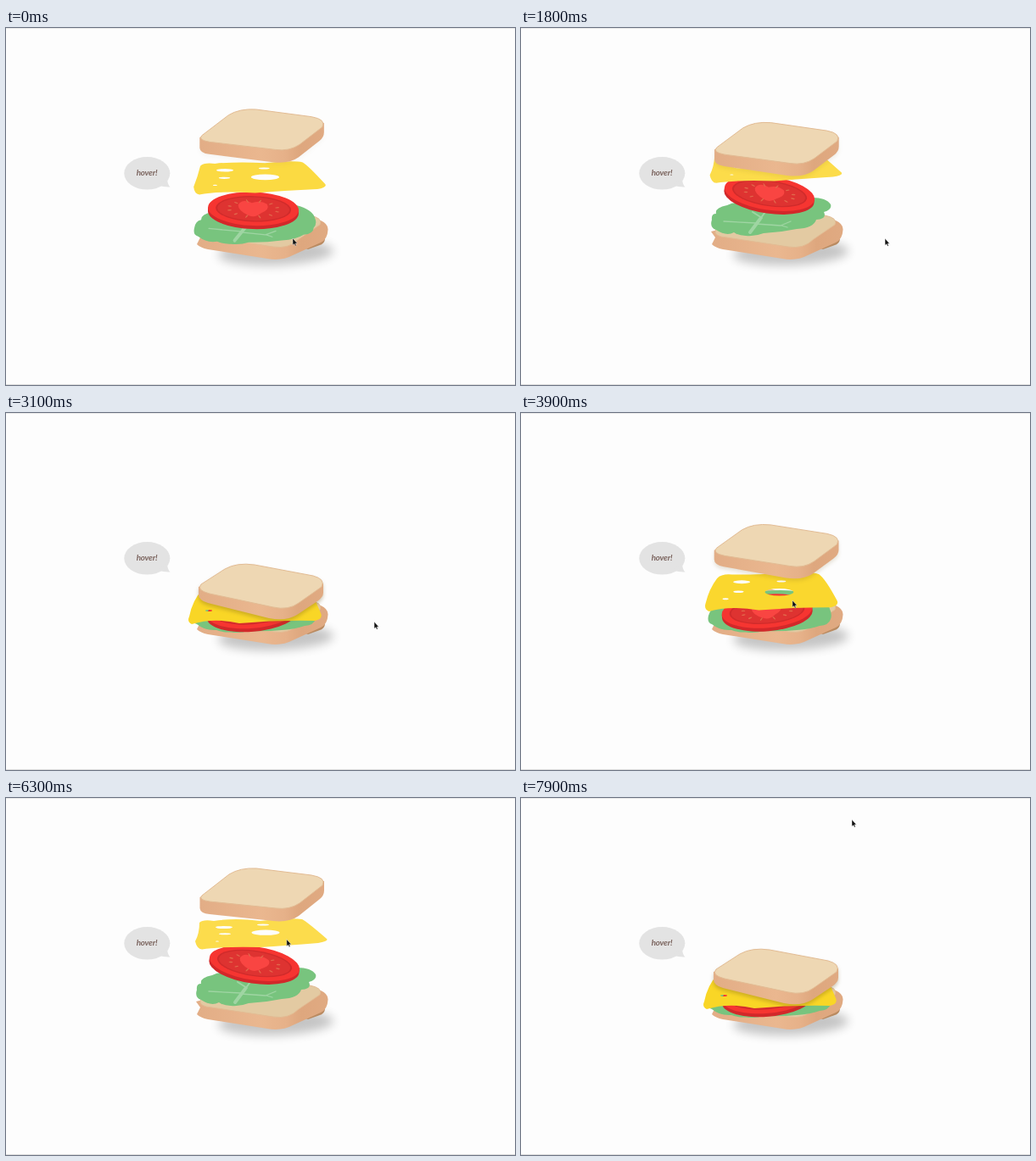
An HTML page that plays this animation: 600x421 px, repeating every 8 s.

```html
<!DOCTYPE html>
<html lang="en">
<head>
<meta charset="utf-8">
<title>Hover sandwich</title>
<style>
  html, body { margin: 0; width: 100%; height: 100%; overflow: hidden; background: #fdfdfd; }
  svg { display: block; width: 600px; height: 421px; }
  text { font: italic 700 9.8px Lato, sans-serif; letter-spacing: -.2px; fill: #7b645e; }
  .face { fill: #eed7b3; stroke: #e2bb93; stroke-width: 1; }
  .vein { fill: none; stroke: #9fd5a3; stroke-linecap: round; stroke-linejoin: round; }
</style>
</head>
<body>
<svg viewBox="0 0 600 421">
  <defs>
    <linearGradient id="crust">
      <stop offset="0" stop-color="#e2ad86"/>
      <stop offset=".5" stop-color="#eab78f"/>
      <stop offset=".68" stop-color="#e6b189"/>
      <stop offset=".8" stop-color="#dea77e"/>
      <stop offset="1" stop-color="#e0aa82"/>
    </linearGradient>
    <filter id="soft" x="-30%" y="-80%" width="160%" height="260%">
      <feGaussianBlur stdDeviation="6"/>
    </filter>
  </defs>

  <path d="M0 .5H600" stroke="#e9e9e9"/>
  <path d="M0 420.5H600" stroke="#dedede"/>

  <g fill="#e3e3e3">
    <ellipse cx="166.3" cy="171.3" rx="27" ry="19.3"/>
    <path d="M190 177Q190 184 193.500 187.500Q186 188 179 185z"/>
  </g>
  <text x="166" y="174" text-anchor="middle">hover!</text>

  <ellipse cx="318" cy="265" rx="68" ry="15" fill="#000" opacity=".22"
    transform="rotate(-2 318 265)" filter="url(#soft)"/>

  <path fill="#b98a60" d="M350 259L376 248Q376 254 370 256L356 261z"/>
  <path fill="url(#crust)" d="M224 240L229 247L225 255Q229 259 238 261L308 272Q325 275 338 268L371 253Q379 249 379.500 238Q380 231 371 227L293 209L240 236z"/>
  <path class="face" style="fill:#e3caa2" d="M230 237L259 214Q273 205 293 208L358 221Q374 224 370 232L345 249Q333 261 315 258L236 246Q226 243 230 237z"/>

  <path id="lettuce" fill="#78c47e"/>
  <g id="veins" class="vein">
    <path stroke-width="4" d="M270 241L282 225"/>
    <path stroke-width="2" d="M280 228L290 214M284 224L273 217"/>
    <path stroke-width="1.300" d="M239 228L277 230M277 231L306 233L318 228M307 233L314 235"/>
  </g>

  <g id="tomato">
    <path d="M-53.500 0V4A53.500 19.800 0 0 0 53.500 4V0z" fill="#d2282a"/>
    <ellipse rx="53.5" ry="19.8" fill="#f63531"/>
    <ellipse rx="44.5" ry="15.2" fill="#d02b2b"/>
    <ellipse rx="42.5" ry="13.8" fill="#de3331"/>
    <path fill="#f94542" d="M-18 -4Q-14 -12 -2 -7Q8 -11 16 -6Q20 0 9 5Q2 11 -5 8Q-18 3 -18 -4z"/>
    <g id="seeds" fill="#e2684c"/>
  </g>

  <path id="cheese" fill-rule="evenodd"/>

  <g id="lid">
    <path id="side" fill="url(#crust)"/>
    <path id="top" class="face"/>
  </g>

  <path id="cursor" d="M0 0V8L1.800 6.500L3 9L4.200 8.400L3.100 6H5.400z"
    fill="#111" stroke="#fff" stroke-width=".4"/>
</svg>

<script>
const LOOP = 8000, MOVE = 800;
const OPENS = [-456, 3670], CLOSES = [1640, 6730];
const $ = id => document.getElementById(id);

const hole = (x, y, rx, ry) =>
  `M${x - rx} ${y}a${rx} ${ry} 0 1 0 ${2 * rx} 0a${rx} ${ry} 0 1 0 ${-2 * rx} 0z`;

// Each shape: [closed, open], with matching path commands
const SHAPES = {
  top: [
    'M230 202L258 184Q272 176 293 179L362 192Q377 196 372 205L345 224Q333 233 315 229L240 213Q224 209 230 202z',
    'M231 115L263 90Q276 82 295 83L360 91Q378 94 373 103L346 124Q334 132 318 130L240 122Q226 120 231 115z'
  ],
  side: [
    'M227 205L227 214Q227 221 238 224L310 242Q330 246 343 238L367 222Q374 217 374 212L374 201L290 185z',
    'M228.500 117L228.500 130Q229 136 240 137L315 145Q334 147 345 139L370 119Q375 115 375 109L375 98L290 88z'
  ],
  cheese: [
    'M232 208Q238 202 250 203Q290 204 320 201Q345 199 352 203Q360 209 371 236Q374 243 364 245Q320 244 275 248Q245 241 219 249Q213 246 216 240Q220 220 232 208z' +
      hole(261, 212, 10, 2) + hole(256, 224.5, 6, 1.4) + hole(304, 225.5, 17, 4.5) +
      hole(308, 212, 5, 1) + hole(239, 233, 4, 1.1),
    'M228 147Q232 143 245 145Q270 141 300 145Q335 141 349 143Q355 146 378 166Q381 169 368 171Q330 174 300 176Q250 175 231 178.500Q225 178 223 169Q228 160 228 147z' +
      hole(257, 152.5, 10, 1.6) + hole(258, 160.3, 7, 1) + hole(306, 158.7, 16.5, 3.1) +
      hole(303, 149.5, 7, 1) + hole(249, 169, 2, .5)
  ],
  lettuce: [
    'M221 239Q223 231 230 229Q231 222 243 221Q251 215 260 217Q270 215 278 211Q311 206 343 213Q362 220 364 231Q367 238 365 243Q363 250 352 251Q341 255 325 256Q305 258 286 257Q276 260 265 258.500Q256 259 248 256Q235 257 225 249Q219 247 221 239z',
    'M225 226Q224 219 230 219Q228 212 243 209Q252 204 260 207Q270 207 278 203Q310 196 343 200Q360 200 365 208Q367 214 357 217Q361 225 348 226Q345 236 325 237Q306 241 286 242Q276 246 265 245Q256 245 251 241Q242 246 230 238Q222 236 225 226z'
  ]
};

// time, x, y
const PATH = [
  [0, 338, 248], [1480, 338, 248], [1640, 380, 249], [1850, 444, 248],
  [3000, 444, 248], [3670, 378, 236], [3900, 320, 221], [4100, 309, 219],
  [6000, 309, 219], [6730, 362, 92], [6800, 385, 40], [6900, 390, 25.5], [LOOP, 390, 25.5]
];

const lerp = (a, b, k) => a + (b - a) * k;
const NUM = /-?\d*\.?\d+/g;

function mix([a, b], k) {
  const ends = b.match(NUM);
  let i = 0;
  return a.replace(NUM, n => +lerp(+n, +ends[i++], k).toFixed(2));
}

// cubic-bezier(.25, .1, .25, 1)
function ease(x) {
  if (x <= 0) return 0;
  if (x >= 1) return 1;
  const curve = (s, a, b) => 3 * s * (1 - s) ** 2 * a + 3 * s * s * (1 - s) * b + s ** 3;
  let lo = 0, hi = 1;
  for (let i = 0; i < 22; i++) {
    const mid = (lo + hi) / 2;
    if (curve(mid, .25, .25) < x) lo = mid; else hi = mid;
  }
  return curve(lo, .1, 1);
}

// 0 = closed, 1 = open
function openness(t, delay) {
  const sum = starts => starts.reduce((s, at) => s + ease((t - at - delay) / MOVE), 0);
  return sum(OPENS) - sum(CLOSES);
}

function pointer(t) {
  const i = PATH.findIndex(p => p[0] > t);
  const [t0, x0, y0] = PATH[i - 1], [t1, x1, y1] = PATH[i];
  const k = (t - t0) / (t1 - t0);
  return [lerp(x0, x1, k), lerp(y0, y1, k)];
}

const morph = (id, k) => $(id).setAttribute('d', mix(SHAPES[id], k));

function place(id, x, y, turn = 0, pivot = '') {
  $(id).setAttribute('transform', `translate(${x} ${y}) rotate(${turn} ${pivot})`);
}

function draw(t) {
  const lid = openness(t, 0), cheese = openness(t, 100);
  const tomato = openness(t, 210), lettuce = openness(t, 300);
  morph('top', lid);
  morph('side', lid);
  morph('cheese', cheese);
  morph('lettuce', lettuce);
  $('cheese').style.fill = mix(['rgb(249, 214, 38)', 'rgb(252, 220, 76)'], cheese);
  $('lid').style.filter = `drop-shadow(0 3px 2px rgba(110, 85, 20, ${.3 * (1 - lid)}))`;
  place('tomato', lerp(290, 293, tomato), lerp(234, 195, tomato), lerp(-5, 8, tomato));
  place('veins', 0, 14 * (1 - lettuce), 3 * (1 - lettuce), '280 230');
  place('cursor', ...pointer(t));
}

for (let i = 0; i < 12; i++) {
  const a = (i + .5) * Math.PI / 6;
  const x = 29 * Math.cos(a), y = 9.3 * Math.sin(a);
  $('seeds').insertAdjacentHTML('beforeend',
    `<ellipse rx="2.400" ry=".7" transform="translate(${x} ${y}) rotate(${Math.atan2(y, x) * 180 / Math.PI})"/>`);
}

const start = performance.now();
function tick() {
  draw((performance.now() - start) % LOOP);
  requestAnimationFrame(tick);
}
tick();
</script>
</body>
</html>
```
